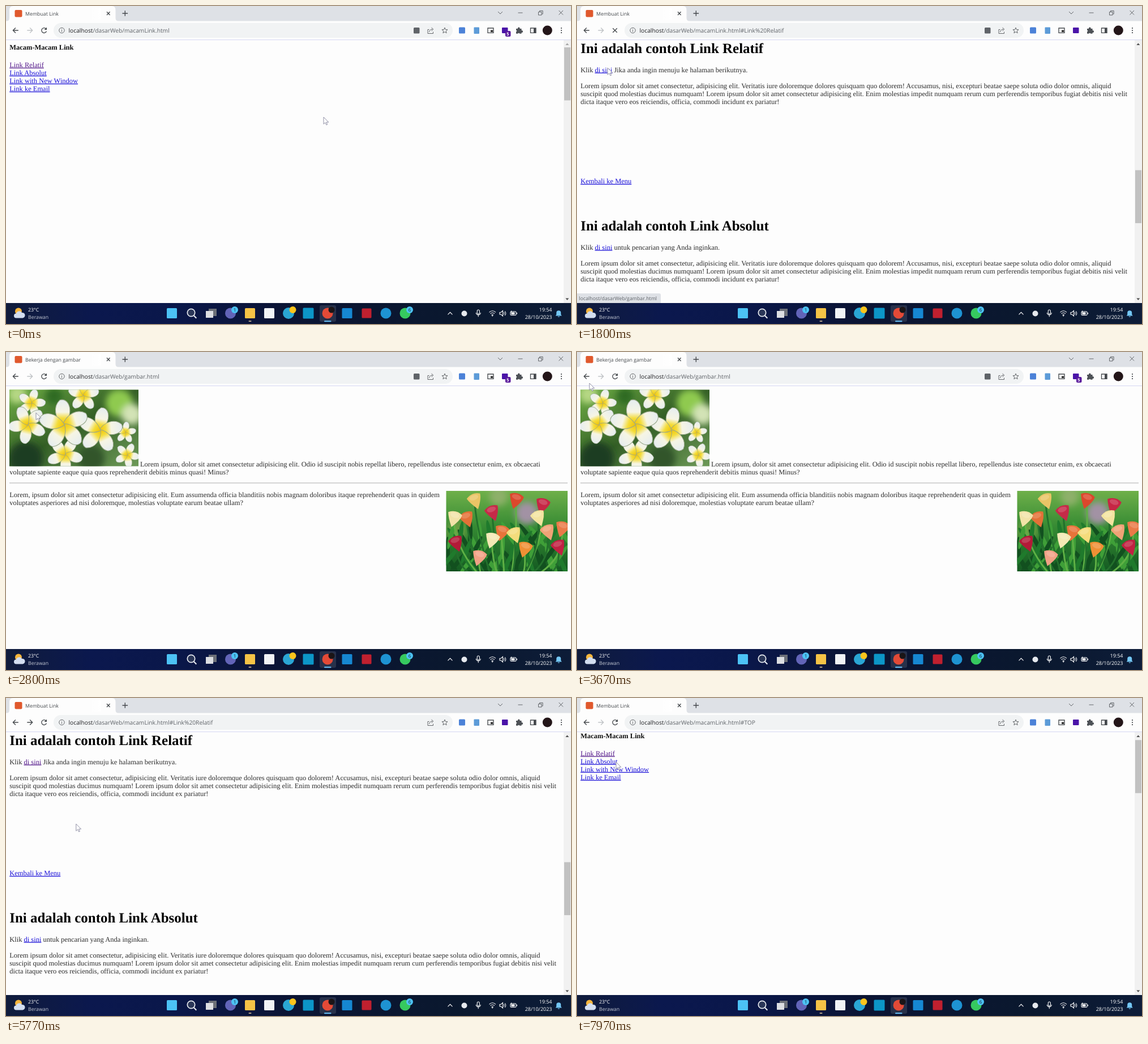
Recreate the animation shown at these times as an HTML page. Size 998 by 561 pixels, loop 8 s.

```html
<!DOCTYPE html>
<html lang="id">
<head>
<meta charset="utf-8">
<title>Membuat Link</title>
<style>
html, body { margin: 0; width: 100%; height: 100%; overflow: hidden; background: #fdfdfd; }
svg { display: block; width: 100vw; height: 100vh; }
text { text-rendering: geometricPrecision; white-space: pre; }
.ui { font-family: "Open Sans", "Noto Sans", sans-serif; font-size: 8.8px; }
.doc { font-family: "Liberation Serif", "Times New Roman", serif; font-size: 12.475px; fill: #2c2c2c; }
.doc .h1 { font-size: 24.95px; font-weight: bold; fill: #000; }
.doc .b { font-weight: bold; fill: #111; }
.a { fill: #1a10d8; text-decoration: underline; }
.v { fill: #551a8b; text-decoration: underline; }
.line { fill: none; stroke: #45494d; stroke-width: 1.35; }
.thin { fill: none; stroke: #55585c; stroke-width: .9; }
.tray { fill: none; stroke: #fff; stroke-width: 1.1; }
</style>
</head>
<body>
<svg id="stage" viewBox="0 0 998 561" preserveAspectRatio="none">
<defs>
  <linearGradient id="bar">
    <stop offset="0" stop-color="#101c3c"/><stop offset=".15" stop-color="#0b184e"/>
    <stop offset=".3" stop-color="#0a174a"/><stop offset=".5" stop-color="#0b1434"/>
    <stop offset=".8" stop-color="#0a182e"/><stop offset="1" stop-color="#0d1c38"/>
  </linearGradient>
  <linearGradient id="petal" x1="0" y1="1" x2="0" y2="0">
    <stop offset="0" stop-color="#f0c000"/><stop offset=".28" stop-color="#f4dc3a"/>
    <stop offset=".52" stop-color="#f6f5e4"/><stop offset="1" stop-color="#e6edf0"/>
  </linearGradient>
  <linearGradient id="leafA" x1="0" y1="0" x2="1" y2="1">
    <stop offset="0" stop-color="#6fae45"/><stop offset=".5" stop-color="#345f26"/><stop offset="1" stop-color="#6d9a58"/>
  </linearGradient>
  <linearGradient id="leafB" x1="0" y1="0" x2="0" y2="1">
    <stop offset="0" stop-color="#6fb04a"/><stop offset=".45" stop-color="#358a33"/><stop offset="1" stop-color="#145a22"/>
  </linearGradient>
  <linearGradient id="fade"><stop offset="0" stop-color="#fff" stop-opacity="0"/><stop offset="1" stop-color="#fff"/></linearGradient>
  <filter id="soft"><feGaussianBlur stdDeviation="6"/></filter>
  <clipPath id="view"><rect y="60" width="998" height="464"/></clipPath>
  <clipPath id="clipA"><rect id="loaded" x="6" y="66.5" width="228" height="135"/></clipPath>
  <clipPath id="clipB"><rect x="777.5" y="245" width="214.5" height="142"/></clipPath>
  <clipPath id="clipTab"><rect x="34" y="4" width="134" height="20"/></clipPath>
  <g id="bloom"></g>
</defs>

<rect width="998" height="561" fill="#fdfdfd"/>

<g class="doc" clip-path="url(#view)">
  <g id="menuPage"></g>
  <g id="photoPage">
    <g clip-path="url(#clipA)" id="photoA"></g>
    <g clip-path="url(#clipB)" id="photoB"></g>
    <text x="237" y="201.6">Lorem ipsum, dolor sit amet consectetur adipisicing elit. Odio id suscipit nobis repellat libero, repellendus iste consectetur enim, ex obcaecati</text>
    <text x="6.2" y="215.8">voluptate sapiente eaque quia quos reprehenderit debitis minus quasi! Minus?</text>
    <path d="M6 231H992" stroke="#a8a8a8" stroke-width="1"/><path d="M6 232H992" stroke="#e6e6e6" stroke-width=".8"/>
    <text id="para1" x="6.2" y="255.8"></text>
    <text id="para2" x="6.2" y="269.8"></text>
  </g>
  <g id="scroll">
    <rect x="985" y="60" width="13" height="464" fill="#f1f1f1"/>
    <rect id="thumb" x="986" width="11" height="93.5" fill="#c1c1c1"/>
    <path id="up" d="M988.3 69l3-3.4 3 3.4z"/><path d="M988.3 515.6l3 3.4 3-3.4z" fill="#505050"/>
  </g>
</g>

<g id="status" class="ui">
  <path id="statusBox" fill="#dee1e6"/>
  <text id="statusText" x="3.5" y="518.8" fill="#5f6368"></text>
</g>

<g class="ui">
  <rect width="998" height="27" fill="#dee1e6"/>
  <rect y="26.5" width="998" height="33" fill="#fdfdfd"/>
  <path d="M0 59.7H998" stroke="#d3d6f2" stroke-width="1"/>
  <path d="M0 27Q6 27 6 21V7Q6 0 13 0H187Q193.5 0 193.5 7V21Q193.5 27 200 27Z" fill="#fdfdfd"/>
  <rect id="favicon" x="15.5" y="7" width="13" height="12.5" rx="2" fill="#e0592d"/>
  <g id="spinner"><circle cx="22" cy="13" r="4.3" class="thin" stroke-dasharray="17 10"/><circle cx="22" cy="13" r="1.5" fill="#777"/></g>
  <g clip-path="url(#clipTab)"><text id="title" x="34" y="16.5" fill="#45494d"></text><rect x="146" y="4" width="22" height="20" fill="url(#fade)"/></g>
  <path class="line" d="M178 10.3l5.6 5.6M183.6 10.3l-5.6 5.6M205.5 13h9.6M210.3 8.2v9.6"/>
  <path class="thin" d="M869 10l4 4 4-4M904.5 12h8M940.5 10.5h5.5v5.5h-5.5zM942.5 10v-1.6h5.6v5.7h-1.6M976.5 8l7.5 7.5M984 8l-7.5 7.5"/>

  <circle id="hover" cx="17" cy="43" r="11" fill="#e3e5e8"/>
  <path class="line" d="M21.8 43H12.6M16.9 38.5l-4.5 4.5 4.5 4.5"/>
  <path id="forward" class="line" d="M37.3 43h9.2M42.2 38.5l4.5 4.5-4.5 4.5"/>
  <g id="reload"><path class="line" d="M70.7 40.3a4.4 4.4 0 1 0 .7 4.2"/><path d="M72 37.5v4.5h-4.5z" fill="#45494d"/></g>
  <path id="stop" class="line" d="M63.2 39.2l7.6 7.6M70.8 39.2l-7.6 7.6"/>
  <rect x="84" y="30" width="705" height="26" rx="13" fill="#f1f3f4"/>
  <circle class="thin" cx="98.5" cy="43" r="4.7"/><path class="thin" d="M98.5 42.3v3.3M98.5 40.2v1"/>
  <text x="110.5" y="46.7" font-size="10.25" style="font-size:10.25px" fill="#5f6368"><tspan fill="#202124">localhost</tspan><tspan id="url"></tspan></text>
  <rect id="translate" x="720" y="38" width="10.5" height="10.5" rx="1.5" fill="#5f6368"/>
  <path class="thin" d="M747.5 41.5h-2.5v7h9.5v-3M747.5 46q.5-4.5 5.5-5M751.5 38.2l3.3 2.8-3.3 2.8"/>
  <path id="star" class="thin"/>
  <rect x="800" y="37.5" width="11" height="11" rx="1.5" fill="#4c82d8"/>
  <rect x="826.5" y="37.5" width="9.5" height="11.5" rx="1" fill="#5c9bd8"/>
  <path class="line" d="M851 39h10v8.3h-10z"/><rect x="856" y="42.5" width="4" height="3.5" fill="#333"/>
  <rect x="876" y="38" width="10.5" height="10" rx="1" fill="#4a14a8"/>
  <g id="badge"><rect x="882" y="44" width="9.5" height="10" rx="2" fill="#5a1a9c"/><text x="884.3" y="52" style="font-size:7.5px" font-weight="bold" fill="#fff">5</text></g>
  <path d="M901 40h3a1.9 1.9 0 1 1 3.6 0h3v3.2a1.9 1.9 0 1 1 0 3.6v2h-3.3a1.7 1.7 0 0 0-3.2 0H901v-3.2a1.7 1.7 0 0 0 0-3.2z" fill="#4d5156"/>
  <path class="line" d="M926.5 39h9.5v8.3h-9.5z"/><rect x="932" y="39" width="4" height="8.3" fill="#45494d"/>
  <circle cx="956.3" cy="43" r="8.5" fill="#231518"/>
  <path d="M981 39v.1M981 43v.1M981 47v.1" stroke="#45494d" stroke-width="2.2" stroke-linecap="round"/>
</g>

<g id="taskbar" class="ui">
  <rect y="524" width="998" height="37" fill="url(#bar)"/>
  <circle cx="22" cy="538.5" r="6" fill="#f6b53c"/>
  <path d="M18 550.5a4 4 0 0 1 0-8 5.5 5.5 0 0 1 10-1.5 4.8 4.8 0 0 1 1.5 9.5z" fill="#d3def0"/>
  <text x="39" y="539" fill="#fff">23°C</text><text x="39" y="551.5" fill="#c3c8d4">Berawan</text>
  <rect x="554" y="528" width="29" height="29" rx="3" fill="#fff" opacity=".12"/>
  <g id="apps"></g>
  <circle cx="327" cy="541" r="6.7" fill="#2a3658" stroke="#e8ebf0" stroke-width="1.7"/><path d="M331.7 546l4.6 4.8" stroke="#e8ebf0" stroke-width="2"/>
  <rect x="358" y="534" width="14" height="13" fill="#6c7078"/><rect x="353" y="538" width="13" height="12" fill="#dcdee2"/>
  <rect x="428.5" y="555" width="5" height="2" rx="1" fill="#b4a48c"/>
  <rect x="562" y="555" width="12.5" height="2.2" rx="1" fill="#63b8ee"/>
  <path class="tray" d="M780.5 544.3l4-4 4 4"/>
  <circle cx="809.5" cy="542.5" r="5" fill="#e6e9ee"/>
  <rect x="832.3" y="536" width="4" height="7.5" rx="2" class="tray"/><path class="tray" d="M830.3 541a4 4 0 0 0 8 0M834.3 545.2v3"/>
  <path class="tray" d="M853.5 540.3q5.7-5 11.4 0M855.5 542.8q3.7-3 7.4 0M857.5 545.2q1.7-1.2 3.4 0"/><circle cx="859.2" cy="546.5" r="1" fill="#fff"/>
  <path class="tray" d="M872 540.5h2.2l3.3-3v9.5l-3.3-3H872zM879.5 540q1.5 2.3 0 4.5M881.3 538.5q3 3.8 0 7.5"/>
  <rect x="891" y="539" width="10" height="6.5" rx="1.5" class="tray"/><rect x="892.5" y="540.3" width="6" height="4" fill="#fff"/><path class="tray" d="M902.5 541v2.5M892.5 537.5v3"/>
  <g fill="#fff" text-anchor="end" style="font-size:9px"><text x="964.5" y="539">19:54</text><text x="964.5" y="551.5">28/10/2023</text></g>
  <path d="M970.7 546.5l1.5-2.2v-3a4 4 0 0 1 8 0v3l1.5 2.2zM974.3 547.5h4q-2 2.5-4 0z" fill="#74c7f5"/>
</g>

<path id="cursor" d="M0 0V12.3L2.9 9.7 4.9 13.9 6.7 13 4.8 9H8.8Z" fill="#fff" stroke="#85859c" stroke-width=".9" stroke-linejoin="round"/>
</svg>

<script>
const $ = id => document.getElementById(id);
const show = (id, on) => { $(id).style.display = on ? '' : 'none'; };
const text = (x, y, s, cls = '') => `<text x="${x}" y="${y}" class="${cls}">${s}</text>`;
const LEFT = 6.24, LINE = 14.03, SECTION = 1083;

// Link page: menu, then sections further down
const lorem = [
  'Lorem ipsum dolor sit amet consectetur, adipisicing elit. Veritatis iure doloremque dolores quisquam quo dolorem! Accusamus, nisi, excepturi beatae saepe soluta odio dolor omnis, aliquid',
  'suscipit quod molestias ducimus numquam! Lorem ipsum dolor sit amet consectetur adipisicing elit. Enim molestias impedit numquam rerum cum perferendis temporibus fugiat debitis nisi velit',
  'dicta itaque vero eos reiciendis, officia, commodi incidunt ex pariatur!'
];
function section(y, name, tail, id) {
  return text(LEFT, y + 83, 'Ini adalah contoh Link ' + name, 'h1')
    + text(LEFT, y + 116.5, `Klik <tspan class="a" id="${id}">di sini</tspan> ${tail}`)
    + lorem.map((s, i) => text(LEFT, y + 144.5 + i * LINE, s)).join('')
    + text(LEFT, y + 312.9, 'Kembali ke Menu', 'a');
}
$('menuPage').innerHTML = text(LEFT, 77.2, 'Macam-Macam Link', 'b')
  + ['Link Relatif', 'Link Absolut', 'Link with New Window', 'Link ke Email']
    .map((s, i) => text(LEFT, 107.8 + i * LINE, s, i ? 'a' : 'v')).join('')
  + section(SECTION, 'Relatif', 'Jika anda ingin menuju ke halaman berikutnya.', 'next')
  + section(SECTION + 313, 'Absolut', 'untuk pencarian yang Anda inginkan.', 'search');

// Photos as flat shapes
const blob = (x, y, r, c) => `<circle cx="${x}" cy="${y}" r="${r}" fill="${c}"/>`;
$('bloom').innerHTML = [0, 1, 2, 3, 4].map(i =>
  `<path d="M0 .04C-.34-.2-.46-.7-.16-.98C.2-1.1 .46-.5 0 .04Z" transform="rotate(${i * 72})" fill="url(#petal)" stroke="#9aa88c" stroke-width=".025"/>`).join('');
const blooms = [[45, 90, 25, 20], [137, 76, 28, 150], [38, 128, 34, 50], [211, 142, 19, 10], [214, 182, 22, 30],
  [104, 181, 32, 36], [166, 138, 40, 12], [102, 128, 44, 0]];
$('photoA').innerHTML = '<rect x="6" y="66" width="228" height="136" fill="url(#leafA)"/><g filter="url(#soft)">'
  + blob(85, 78, 15, '#2f6b22') + blob(200, 90, 24, '#8fca50') + blob(20, 75, 16, '#b5d783')
  + blob(35, 188, 30, '#1e3e20') + blob(150, 188, 24, '#31542a') + blob(222, 110, 18, '#d3e3b6') + '</g>'
  + blooms.map(([x, y, r, a]) => `<use href="#bloom" transform="translate(${x} ${y}) rotate(${a}) scale(${r})"/>`).join('');

const lilies = [[828, 262, '#e9c466'], [900, 261, '#dc472c'], [859, 283, '#c52a48'], [947, 270, '#c62645'],
  [814, 294, '#e37137'], [791, 293, '#f2e3a8'], [940, 292, '#f3e3a0'], [875, 318, '#e8743a'], [898, 322, '#f4dc7c'],
  [858, 331, '#f3e9b4'], [957, 317, '#efa376'], [982, 311, '#ea7a48'], [795, 337, '#b31a38'], [916, 347, '#ef9035'],
  [976, 344, '#c02242'], [835, 362, '#f0a185']];
const stems = lilies.map(([x, y], i) => `<path d="M${x} ${y + 6}Q${x + 4} ${y + 55} ${885 + (x - 885) * .5} 396" fill="none" stroke="${i % 2 ? '#5fb045' : '#23702c'}" stroke-width="3"/>`).join('');
const leafColors = ['#12501f', '#3f9f38', '#1f7a2c'];
const leaves = Array.from({ length: 48 }, (_, i) => {
  const x = 780 + i * 37 % 212, y = 350 + 30 * Math.sin(i * 2.3);
  return `<ellipse cx="${x}" cy="${y}" rx="4" ry="24" transform="rotate(${40 * Math.sin(i * 1.7)} ${x} ${y})" fill="${leafColors[i % 3]}"/>`;
}).join('');
const lily = ([x, y, c], i) => `<g transform="translate(${x} ${y}) rotate(${i % 2 ? 18 : -18}) scale(.9)">
  <path d="M-14-8Q0-18 14-10Q14 0 1 18Q-11 2-14-8Z" fill="${c}"/><ellipse cy="-6" rx="9" ry="5" fill="#fff" opacity=".16"/></g>`;
$('photoB').innerHTML = '<rect x="777" y="245" width="216" height="142" fill="url(#leafB)"/><g filter="url(#soft)">'
  + blob(920, 284, 20, '#a292a4') + blob(870, 255, 16, '#8eb06b') + blob(795, 315, 18, '#6b9e43') + '</g>'
  + leaves + stems + lilies.map(lily).join('');

$('star').setAttribute('d', 'M' + Array.from({ length: 10 }, (_, i) => {
  const r = i % 2 ? 2.3 : 5.3, a = i * Math.PI / 5;
  return (775 + r * Math.sin(a)).toFixed(2) + ' ' + (43.4 - r * Math.cos(a)).toFixed(2);
}).join('L') + 'Z');

// Taskbar apps as plain marks
const square = (x, c, s = 18) => `<rect x="${x - s / 2}" y="${542 - s / 2}" width="${s}" height="${s}" rx="1.5" fill="${c}"/>`;
const note = (x, n) => blob(x, 536, 6, '#4cc2f4') + `<text x="${x}" y="539" text-anchor="middle" style="font-size:8px" fill="#123">${n}</text>`;
$('apps').innerHTML = square(293, '#4cc2f5') + blob(396.5, 542, 9.5, '#6264b8') + note(404, 1)
  + square(431, '#f5c346') + square(465, '#f1f3f6') + blob(499, 542, 10, '#2aa6d4') + blob(506.5, 536, 6, '#fcc41c')
  + square(534, '#0c96c8', 19) + blob(568, 542, 9.5, '#e34a37') + blob(575, 536, 5.5, '#1b1517')
  + square(602.5, '#1687d2') + square(637, '#c0202f', 17) + blob(671, 542, 9.5, '#1e93d2')
  + blob(705, 542, 9.5, '#36c95f') + note(713, 6);

const path = [[0, 561, 196], [850, 34, 101], [1050, 34, 101], [1600, 54, 109], [2700, 54, 109], [3670, 22, 55],
  [4100, 17, 43], [4330, 17, 43], [4830, 158, 127], [5130, 166, 132], [5370, 166, 132], [6150, 85, 305],
  [7000, 85, 305], [7800, 69, 116], [7970, 69, 113]];
function pointer(t) {
  const i = path.findIndex(p => p[0] > t);
  if (i < 0) return path[path.length - 1].slice(1);
  const [a, b] = [path[i - 1], path[i]];
  const k = (t - a[0]) / (b[0] - a[0]), e = k * k * (3 - 2 * k);
  return [1, 2].map(n => a[n] + (b[n] - a[n]) * e);
}

// Latest value whose start time has passed
const at = (t, steps) => steps.filter(s => s[0] <= t).pop()[1];
const between = (t, a, b) => t >= a && t < b;
const PAGE = '/dasarWeb/macamLink.html', PHOTO = '/dasarWeb/gambar.html';
const OPEN = 2230, DONE = 2450, BACK = 4430, TOP = 6230;

const eum = 'Lorem, ipsum dolor sit amet consectetur adipisicing elit. Eum assumenda officia blanditiis nobis magnam doloribus itaque reprehenderit quas in quidem';
const mid = 'voluptates asperiores ad nisi doloremque,', end = 'molestias voluptate earum beatae ullam?';

function draw(t) {
  const photo = between(t, OPEN, BACK), loading = between(t, OPEN, DONE);
  const scroll = at(t, [[0, 0], [870, SECTION], [TOP, 6.24]]);
  show('menuPage', !photo);
  show('scroll', !photo);
  show('photoPage', photo);
  $('menuPage').setAttribute('transform', `translate(0 ${-scroll})`);
  $('thumb').setAttribute('y', 73 + scroll * .2);
  $('up').setAttribute('fill', scroll ? '#505050' : '#a3a3a3');
  $('next').setAttribute('class', t < OPEN ? 'a' : 'v');

  $('loaded').setAttribute('height', at(t, [[0, 20], [2300, 48.5], [DONE, 135]]));
  show('photoB', t >= DONE);
  $('para1').textContent = loading ? eum + ' ' + mid : eum;
  $('para2').textContent = loading ? end : mid + ' ' + end;

  $('title').textContent = loading ? 'localhost' + PHOTO : photo ? 'Bekerja dengan gambar' : 'Membuat Link';
  $('url').textContent = at(t, [[0, PAGE], [1050, PAGE + '#Link%20Relatif'], [OPEN, PHOTO],
    [BACK, PAGE + '#Link%20Relatif'], [TOP, PAGE + '#TOP']]);
  show('favicon', !loading);
  show('spinner', loading);
  $('spinner').setAttribute('transform', `rotate(${t * .36} 22 13)`);
  const busy = between(t, 1800, DONE);
  show('reload', !busy);
  show('stop', busy);
  show('hover', between(t, 3950, 5200));
  show('translate', t < BACK);
  show('badge', t < 1800 || between(t, 2600, BACK));
  $('forward').style.stroke = between(t, BACK, TOP) ? '#45494d' : '#c0c3c6';

  const [tip, width] = at(t, [[0, ['', 0]], [700, [PAGE + '#Link Relatif', 213]], [1150, ['', 0]],
    [1350, [PHOTO, 148]], [2500, ['', 0]], [6100, [PAGE + '#TOP', 185]], [6770, ['', 0]]]);
  show('status', width);
  $('statusText').textContent = 'localhost' + tip;
  $('statusBox').setAttribute('d', `M0 507H${width - 3}q3 0 3 3V524H0Z`);

  $('cursor').setAttribute('transform', `translate(${pointer(t)})`);
}

const start = performance.now();
function tick() {
  draw((performance.now() - start) % 8000);
  requestAnimationFrame(tick);
}
draw(0);
requestAnimationFrame(tick);
</script>
</body>
</html>
```
